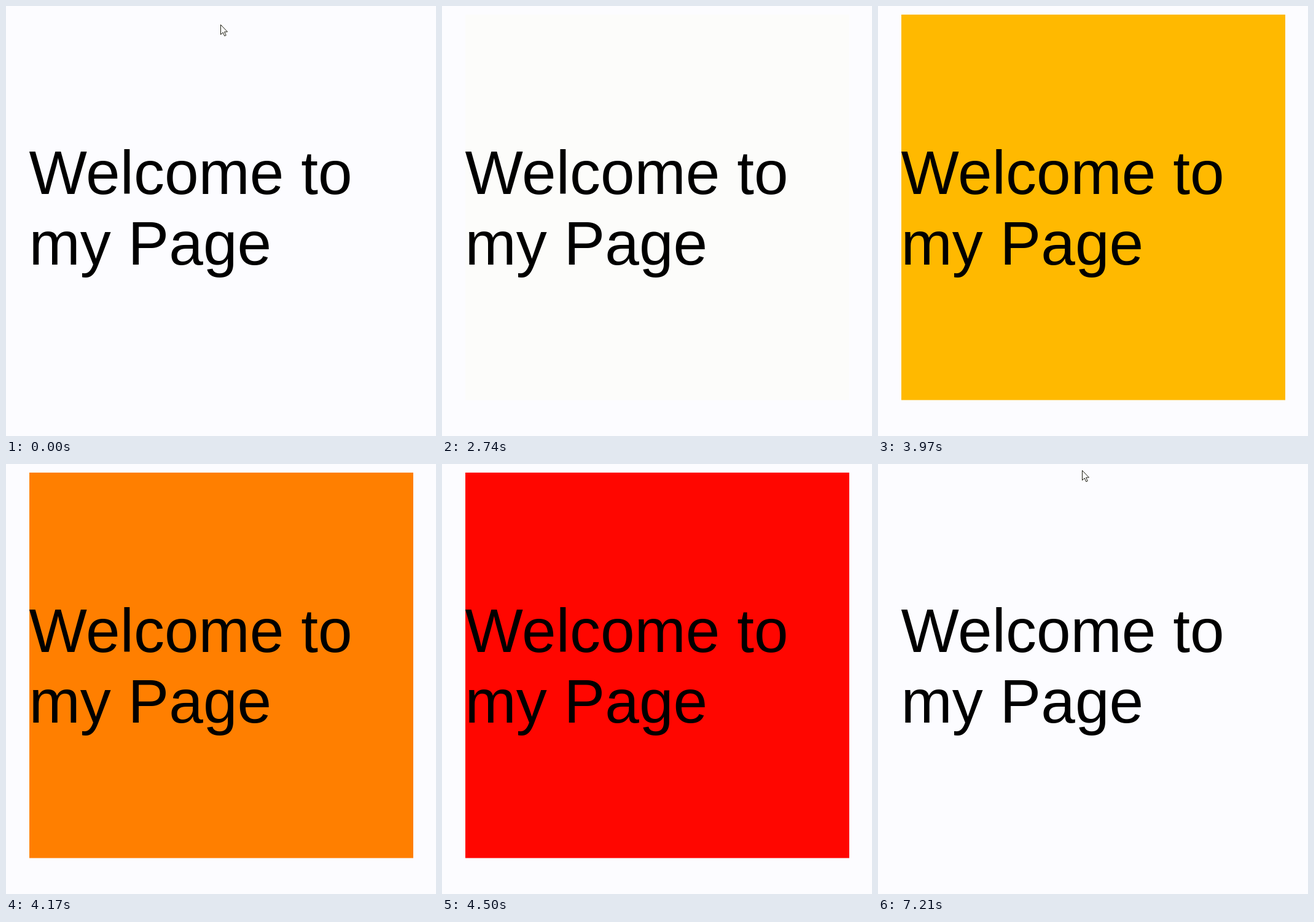
An HTML page that plays this animation: 700x700 px, repeating every 7350 ms.

```html
<!DOCTYPE html>
<html lang="en">
<head>
<meta charset="utf-8">
<title>Welcome</title>
<style>
  html, body { margin: 0; width: 100%; height: 100%; overflow: hidden; background: #fcfcff; }
  svg { display: block; width: 100%; height: 100%; }
  text { font: 100px "Liberation Sans", Arial, sans-serif; }
</style>
</head>
<body>
<svg viewBox="0 0 700 700">
  <rect id="panel" x="38" y="14" width="625" height="627.5"/>
  <text x="37.5" y="305.5">Welcome to</text>
  <text x="37.5" y="420.5">my Page</text>
  <g id="pointer">
    <path id="arrow" d="M.5.5V16.5L4.2 13 6.8 18.8 9.2 17.7 6.6 12H11.5Z"
      fill="#fff" stroke="#1c1c10" stroke-linejoin="round"/>
    <path id="beam" d="M-3-8H3M0-8V9M-3 9H3" fill="none" stroke="#000"/>
  </g>
</svg>
<script>
const LOOP = 7350;
const FADE_START = 2725, FADE_STEP = 448;
const $ = id => document.getElementById(id);
const panel = $('panel'), pointer = $('pointer'), arrow = $('arrow'), beam = $('beam');

const page = [252, 252, 255], pale = [255, 255, 128], yellow = [255, 255, 0];
const orange = [255, 165, 0], red = [255, 0, 0];
const fade = [page, pale, yellow, orange, red, page];

const roam = [[349, 30], [60, 290], [590, 290], [680, 70], [290, 380], [235, 330], [213, 270], [250, -30]];
const comeBack = [[620, 192], [332, 10]];

const clamp = (v, lo, hi) => Math.min(hi, Math.max(lo, v));
const progress = (t, from, to) => clamp((t - from) / (to - from), 0, 1);
const show = (el, on) => el.setAttribute('visibility', on ? 'visible' : 'hidden');

// Evenly timed stops, blended linearly.
function blend(stops, p) {
  const s = p * (stops.length - 1);
  const i = Math.min(Math.floor(s), stops.length - 2);
  return stops[i].map((v, k) => v + (stops[i + 1][k] - v) * (s - i));
}

// Catmull-Rom curve through evenly timed points.
function curve(points, p) {
  const last = points.length - 1, s = p * last;
  const i = Math.min(Math.floor(s), last - 1), u = s - i;
  const [a, b, c, d] = [-1, 0, 1, 2].map(n => points[clamp(i + n, 0, last)]);
  return [0, 1].map(k => b[k] + u / 2 * (c[k] - a[k] +
    u * (2 * a[k] - 5 * b[k] + 4 * c[k] - d[k] +
    u * (3 * (b[k] - c[k]) + d[k] - a[k]))));
}

function pointerAt(t) {
  if (t < FADE_START) return curve(roam, progress(t, 30, FADE_START));
  if (t >= 6610) return curve(comeBack, progress(t, 6610, 7210));
  return null;
}

const overText = (x, y) =>
  x > 38 && y > 212 && y < 442 && x < (y < 327 ? 564 : 432);

function draw(t) {
  const fadeEnd = FADE_START + FADE_STEP * (fade.length - 1);
  const color = blend(fade, progress(t, FADE_START, fadeEnd));
  panel.setAttribute('fill', `rgb(${color.map(Math.round)})`);

  const at = pointerAt(t);
  const text = at && overText(...at);
  if (at) pointer.setAttribute('transform', `translate(${at.map(Math.round)})`);
  show(arrow, at && !text);
  show(beam, text);
}

const start = performance.now();
function tick() {
  draw((performance.now() - start) % LOOP);
  requestAnimationFrame(tick);
}
tick();
</script>
</body>
</html>
```
